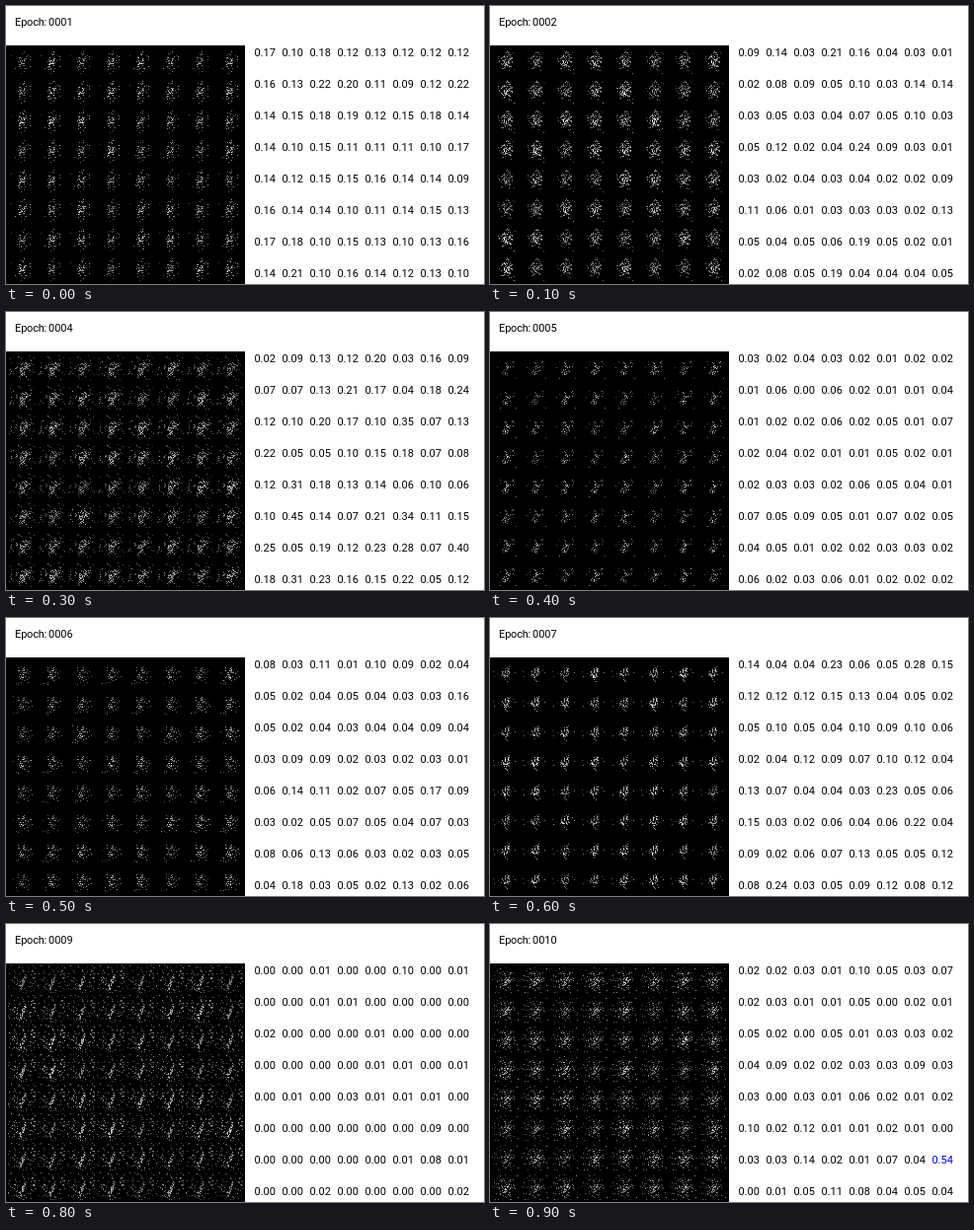
These frames come from a looping animation (484 px wide and 282 px high, 1 s). An HTML page with a canvas:

```html
<!DOCTYPE html>
<html lang="en">
<head>
<meta charset="utf-8">
<title>Generator samples by epoch</title>
<style>
  html, body {
    margin: 0;
    width: 100%;
    height: 100%;
    overflow: hidden;
    background: #fff;
  }
  body {
    position: relative;
    font: 11px/16px Roboto, Arial, sans-serif;
    color: #000;
  }
  #title {
    position: absolute;
    left: 9.1px;
    top: 9px;
    white-space: pre;
  }
  #title span { letter-spacing: -.2px; }
  #title b {
    font-weight: 400;
    position: absolute;
    left: 33.9px;
  }
  canvas {
    position: absolute;
    left: 0;
    top: 40px;
    width: 242px;
    height: 242px;
    image-rendering: pixelated;
  }
  #scores {
    position: absolute;
    left: 251.4px;
    top: 40px;
    display: grid;
    grid-template: repeat(8, 32px) / repeat(8, 28px);
  }
  .real { color: #00f; }
</style>
</head>
<body>
<div id="title"><span>Epoch:</span><b id="epoch">0001</b></div>
<canvas id="tiles" width="242" height="242"></canvas>
<div id="scores"></div>

<script>
const SIZE = 242, TILE = 28, PITCH = 30, COUNT = 64, STEP = 100;

// Repeatable value in 0..1 for a set of integers
function rand(...keys) {
  let h = 2166136261;
  for (const key of keys) {
    h = Math.imul(h ^ (key + 1), 2654435761);
    h = Math.imul(h ^ (h >>> 15), 2246822519);
    h = Math.imul(h ^ (h >>> 13), 3266489917);
    h ^= h >>> 16;
  }
  return (h >>> 0) / 4294967296;
}

// Roughly normal value with mean 0 and deviation 1
function normal(...keys) {
  let sum = -2;
  for (let i = 0; i < 4; i++) sum += rand(...keys, i);
  return sum * Math.sqrt(3);
}

// Dot cloud: centre, half length and width, lean, ring radius (0 = filled),
// density of core and halo, halo radius. Scores: median and log spread.
const base = { x: 14, y: 15, len: 6, wid: 3.8, lean: .3, ring: 0,
               core: .42, halo: .025, far: 12, median: .05, spread: .7 };
const epochs = [
  { y: 14.5, len: 6.5, wid: 4.2, lean: .15, halo: .01, median: .135, spread: .2 },
  { y: 14, len: 6.5, wid: 5, lean: .15, halo: .04 },
  { y: 13.5, wid: 5.4, lean: 0, ring: 1, halo: .08, far: 14, median: .025, spread: .55 },
  { x: 15, y: 16, wid: 3.6, core: .45, halo: .1, far: 15, median: .12 },
  { x: 15, y: 15.5, wid: 3.2, lean: .35, median: .03 },
  {},
  { x: 13.5, y: 14, len: 5.5, wid: 4.2, lean: .4, ring: .6, core: .5, median: .07, spread: .6 },
  { y: 16, wid: 2.8, core: .5, halo: .06, far: 15, median: .02, spread: 1 },
  { x: 14.5, y: 17, len: 8, wid: 1.5, core: .75, halo: .09, far: 24, median: .002, spread: 1.7 },
  { x: 14.5, y: 15.5, wid: 5, core: .36, halo: .07, far: 14, median: .02, spread: 1,
    best: { cell: 55, score: .54 } }
].map(e => ({ ...base, ...e }));

function coreShape(e, dx, dy) {
  const sin = Math.sin(e.lean), cos = Math.cos(e.lean);
  const r = Math.hypot((dx * sin - dy * cos) / e.len, (dx * cos + dy * sin) / e.wid);
  return e.ring ? Math.exp(-(((r - e.ring) / .38) ** 2)) : Math.exp(-r * r);
}

const ctx = document.getElementById("tiles").getContext("2d");

// Tiles share one dot pattern, with small differences in hits and brightness
function renderTiles(e, n) {
  const img = ctx.createImageData(SIZE, SIZE);
  for (let i = 3; i < img.data.length; i += 4) img.data[i] = 255;

  for (let p = 0; p < TILE * TILE; p++) {
    const px = p % TILE, py = Math.floor(p / TILE);
    const dx = px - e.x, dy = py - e.y;
    const core = coreShape(e, dx, dy);
    const halo = Math.exp(-((Math.hypot(dx, dy) / e.far) ** 4));
    const density = e.core * core + e.halo * halo;
    const shared = rand(n, p, 500), tone = rand(n, p, 501);
    if (shared > density * 1.5) continue;

    for (let k = 0; k < COUNT; k++) {
      if (shared > density * (.5 + rand(n, p, k))) continue;
      const gain = (.7 + .4 * rand(n, k, 700)) * (.65 + .35 * core);
      const mix = .6 * tone + .4 * rand(n, p, k + 100);
      const v = 255 * gain * (.2 + .9 * mix);
      const x = 2 + PITCH * (k % 8) + px, y = 2 + PITCH * Math.floor(k / 8) + py;
      const at = (y * SIZE + x) * 4;
      img.data.fill(v, at, at + 3);
    }
  }
  return img;
}

function score(e, n, k) {
  if (e.best && e.best.cell === k) return e.best.score;
  return Math.min(.45, e.median * Math.exp(e.spread * normal(n, k, 900)));
}

const label = document.getElementById("epoch");
const grid = document.getElementById("scores");
const cells = Array.from({ length: COUNT }, () => grid.appendChild(document.createElement("div")));
const frames = epochs.map((e, i) => ({
  tiles: renderTiles(e, i),
  list: cells.map((_, k) => score(e, i, k))
}));

function show(i) {
  const { tiles, list } = frames[i];
  label.textContent = String(i + 1).padStart(4, "0");
  ctx.putImageData(tiles, 0, 0);
  cells.forEach((cell, k) => {
    cell.textContent = list[k].toFixed(2);
    cell.className = list[k] > .5 ? "real" : "";
  });
}

const start = performance.now();
let current = 0;
show(0);

function tick() {
  const i = Math.floor((performance.now() - start) / STEP) % frames.length;
  if (i !== current) show(current = i);
  requestAnimationFrame(tick);
}
requestAnimationFrame(tick);
</script>
</body>
</html>
```
